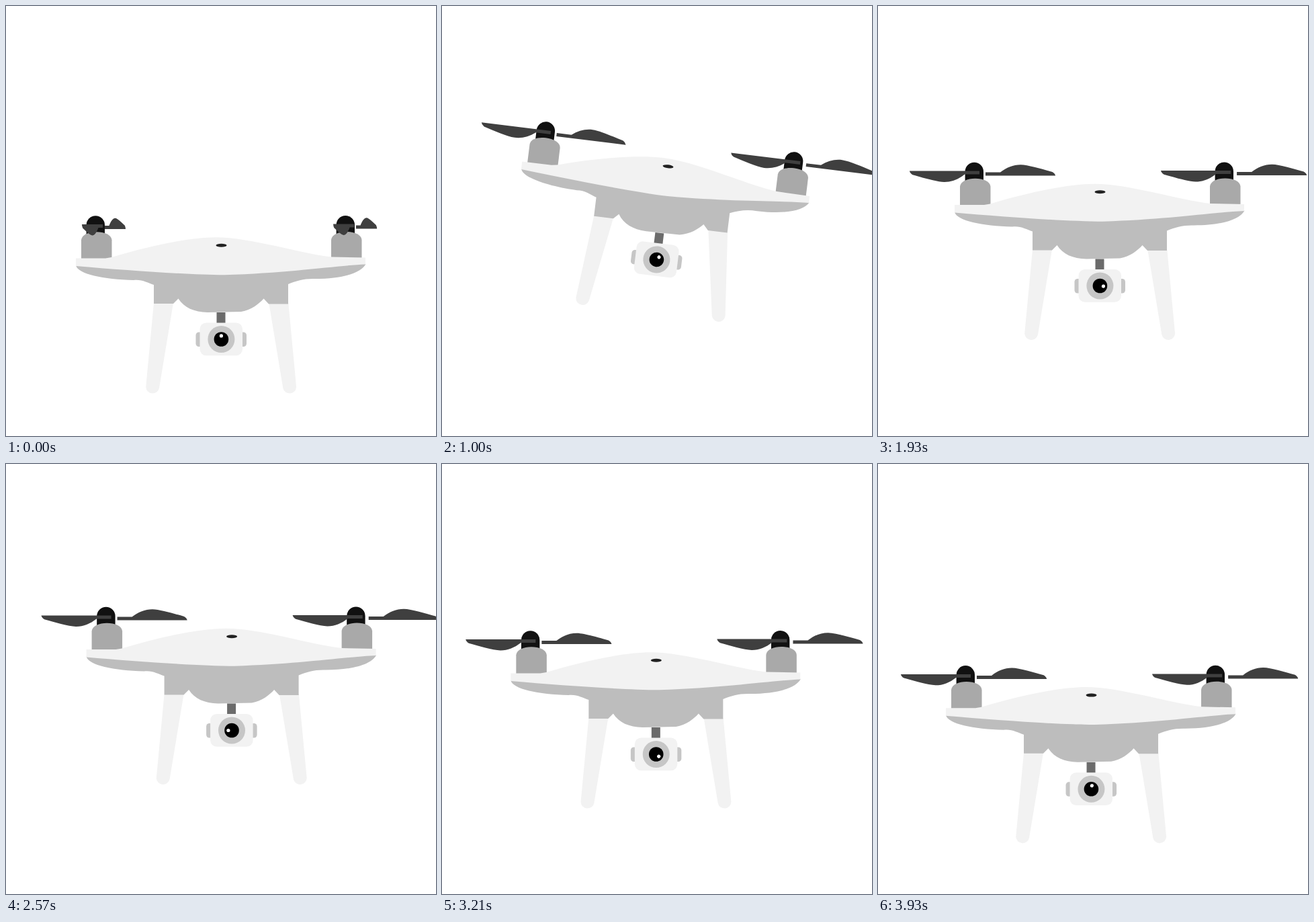
An HTML page for the animation above (4000 ms loop, 640 by 640 pixels).

```html
<!DOCTYPE html>
<html lang="en">
<head>
<meta charset="utf-8">
<title>Hovering drone</title>
<style>
  html, body { margin: 0; width: 100%; height: 100%; overflow: hidden; background: #fff; }
  svg { display: block; width: 100vw; height: 100vh; }
</style>
</head>
<body>
<svg viewBox="0 0 640 640">
  <defs>
    <path id="blade" fill="#3f3f3f" d="M4.5 -1.5H26.5C36 -9 46 -13 57 -12.9C68 -12.7 90 -6 104 -2.2Q108 .2 108.6 3.5H4.5Z"/>
    <g id="prop">
      <use href="#blade"/>
      <use href="#blade" transform="rotate(180)"/>
    </g>
    <g id="motor">
      <path fill="#111" d="M-13.7 30V13.7A13.7 13.7 0 0 1 13.7 13.7V30Z"/>
      <path fill="#a9a9a9" d="M-21.3 65V36C-20.5 28 -10 24 1.3 24C13 24 23.5 28 24.2 36V65Z"/>
    </g>
    <path id="leg" fill="#f2f2f2" d="M220 442H249L228 568.5A10 10 0 0 1 208.2 567Z"/>
  </defs>
  <g id="drone">
    <use href="#motor" x="133.3" y="312.3"/>
    <use href="#motor" x="505.3" y="312"/>
    <use href="#leg"/>
    <use href="#leg" transform="translate(640.3) scale(-1 1)"/>
    <path fill="#bdbdbd" d="M104 386C107 399 145 407 190 408C202 406.5 211 412 220 415V443H249L256.5 435.5C265 449 280 455.5 300 456L350 455C365 452.5 377 443 383.5 435.5L391 443.5H420V414C432 409 444 405.5 460 406C502 406 529 397 535.5 384L320 380Z"/>
    <path fill="#f2f2f2" d="M104 375.5H148L157 374C210 358 270 344.5 312 344.3C365 344.5 435 368 484 373.5L535 374.5V384.5C495 386 425 397 325 400.3C270 400 180 393.5 104 387Z"/>
    <ellipse cx="320.5" cy="356.3" rx="8" ry="2.5" fill="#222"/>
    <rect x="313.5" y="456" width="13" height="17" fill="#6b6b6b"/>
    <rect x="282.5" y="485.5" width="75.5" height="21.5" rx="4.5" fill="#c6c6c6"/>
    <rect x="288.5" y="471.5" width="63.5" height="48.7" rx="9.5" fill="#f2f2f2"/>
    <circle cx="320.4" cy="496" r="20" fill="#c6c6c6"/>
    <circle cx="320.4" cy="496" r="10.8"/>
    <circle id="glint" cx="320.4" cy="490.9" r="2.6" fill="#fff"/>
    <g transform="translate(145.5 328.6)"><use class="prop" href="#prop"/></g>
    <g transform="translate(519.6 328.1)"><use class="prop" href="#prop"/></g>
  </g>
</svg>
<script>
const LOOP = 4000, STEP = LOOP / 56, SPIN_UP = 280;

const path = [
  { t: 0, x: 0, y: 0, tilt: 0, gaze: 0 },
  { t: 500, x: -30.2, y: -70.2, tilt: -7.9, gaze: 138 },
  { t: 1000, x: 5.2, y: -118.2, tilt: 7, gaze: 38 },
  { t: 1400, x: 11, y: -104, tilt: 0, gaze: 60 },
  { t: 1930, x: 10, y: -79.5, tilt: 0, gaze: 98 },
  { t: 2570, x: 15.6, y: -99.5, tilt: 0, gaze: 270 },
  { t: 3210, x: -1.5, y: -64, tilt: 0, gaze: 130 },
  { t: 3500, x: -18.5, y: -76, tilt: 0, gaze: 75 },
  { t: LOOP, x: 0, y: 0, tilt: 0, gaze: 0 }
];

const slope = (a, b, key) => (b[key] - a[key]) / (b.t - a.t);

// Speed at a waypoint: zero where the value turns back
function speed(i, key) {
  const p = path[i], prev = path[i - 1], next = path[i + 1];
  const a = slope(prev || p, prev ? p : next, key);
  const b = slope(next ? p : prev, next || p, key);
  return a * b > 0 ? 2 * a * b / (a + b) : 0;
}

function at(t, key) {
  const i = path.findIndex(p => p.t > t) - 1, a = path[i], b = path[i + 1];
  const h = b.t - a.t, u = (t - a.t) / h, v = 1 - u;
  return v * v * (1 + 2 * u) * a[key] + u * u * (1 + 2 * v) * b[key]
    + h * u * v * (v * speed(i, key) - u * speed(i + 1, key));
}

const drone = document.getElementById("drone");
const glint = document.getElementById("glint");
const props = document.querySelectorAll(".prop");

function draw(t) {
  const width = 0.3 + 0.7 * Math.min(1, t / SPIN_UP);
  drone.setAttribute("transform",
    `translate(${at(t, "x")} ${at(t, "y")}) rotate(${at(t, "tilt")} 320 445)`);
  glint.setAttribute("transform", `rotate(${at(t, "gaze")} 320.4 496)`);
  props.forEach(p => p.setAttribute("transform", `scale(${width} 1)`));
}

const start = performance.now();
function tick(now) {
  const t = Math.max(0, now - start) + 5;
  draw(Math.floor(t % LOOP / STEP) * STEP);
  requestAnimationFrame(tick);
}
draw(0);
requestAnimationFrame(tick);
</script>
</body>
</html>
```
